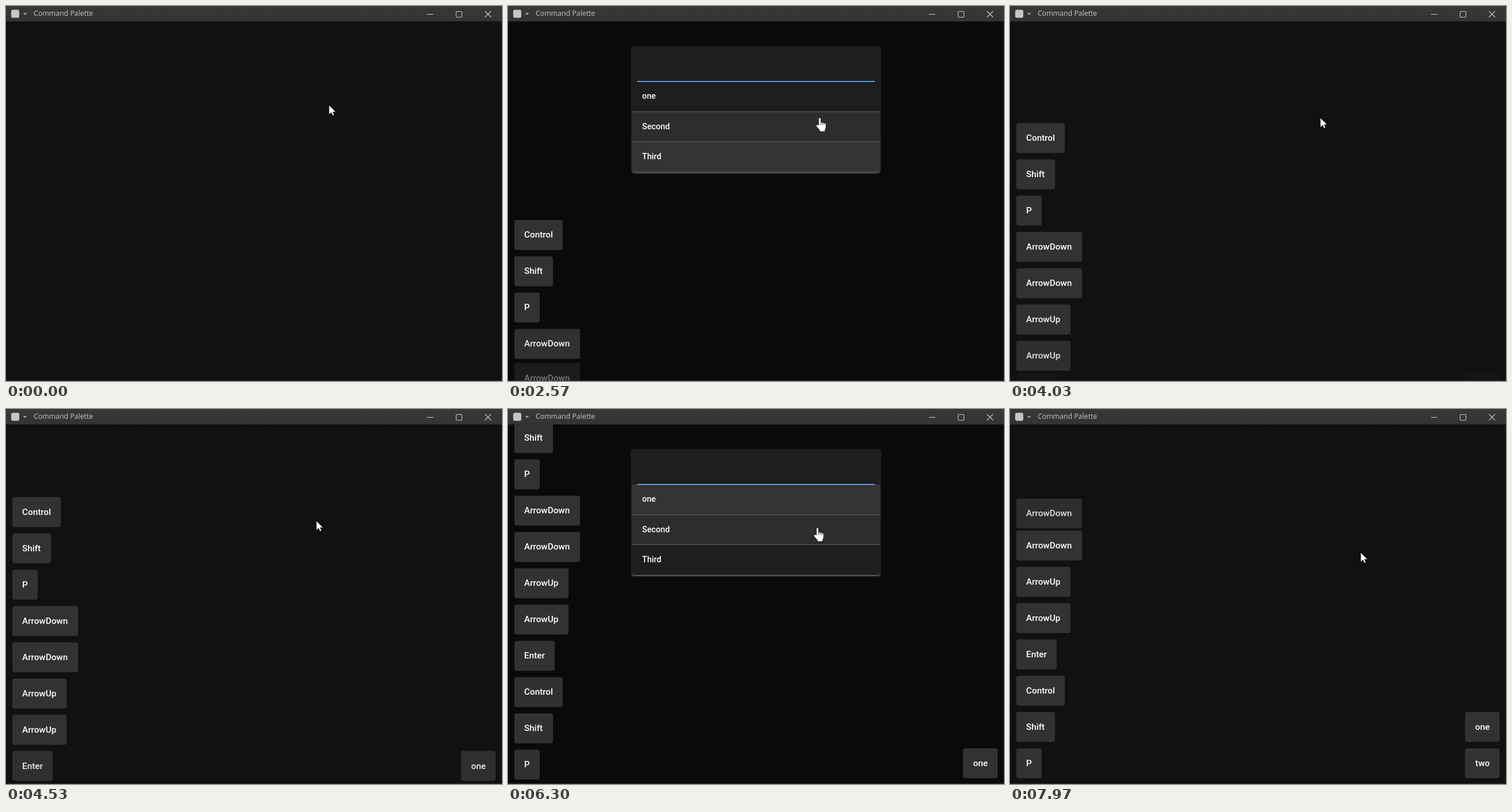
An HTML page for the animation above (8 s loop, 860x651 px).

```html
<!DOCTYPE html>
<html lang="en">
<head>
<meta charset="utf-8">
<title>Command Palette</title>
<style>
  html, body { margin: 0; width: 100%; height: 100%; overflow: hidden; background: #111; }
  #stage { position: relative; width: 860px; height: 651px; overflow: hidden; background: #111; }
  #bar { position: absolute; inset: 0 0 auto; height: 27px; background: linear-gradient(#383838, #343434 25px, #2a2a2a 27px); }
  #bar span { position: absolute; left: 48px; top: 0; font: 12.3px/26px "Open Sans", sans-serif; color: #c2c6ca; }
  #bar svg, #cursor { position: absolute; left: 0; top: 0; overflow: visible; }
  #page { position: absolute; inset: 0; clip-path: inset(27px 0 1px 0); font: 500 15.25px/52px Roboto, sans-serif; color: #fff; }
  #shade { position: absolute; inset: 0; background: #0a0a0a; }
  #panel { position: absolute; left: 215px; top: 70px; width: 430px; height: 219px; border-radius: 4px;
    background: #1e1e1e; box-shadow: 0 1px 3px #666; font-size: 14.3px; }
  #line { position: absolute; z-index: 1; left: 9px; top: 60px; width: 412px; height: 2px; background: #5b99df; }
  #caret { position: absolute; left: 17px; top: 22px; width: 1px; height: 18px; background: #fff; }
  #rows { position: absolute; left: 0; right: 0; top: 61px; }
  .row { box-sizing: border-box; height: 52.5px; padding-left: 17.5px; line-height: 51px; border-bottom: 1px solid #626262; }
  .row:last-child { border-radius: 0 0 4px 4px; }
  .toast { position: absolute; top: 0; height: 52px; padding: 0 17.4px; border-radius: 4px; background: #323232; white-space: nowrap; }
  #edge { position: absolute; inset: 27px 0 0; border: solid #303030; border-width: 0 0 1px; box-shadow: inset -1px 0 #222; }
</style>
</head>
<body>
<div id="stage">
  <div id="page">
    <div id="shade"></div>
    <div id="panel">
      <div id="line"></div><div id="caret"></div>
      <div id="rows"></div>
    </div>
    <div id="toasts"></div>
  </div>
  <div id="bar">
    <svg width="860" height="27" fill="none" stroke="#c8c8c8" stroke-width="1.1">
      <rect x="9" y="6.5" width="14" height="14" rx="3" fill="#c4c5c9" stroke="none"/>
      <path d="M29.5 12h7l-3.5 4z" fill="#999" stroke="none"/>
      <path d="M730 14.5h11M830.5 9l10.5 10.5M841 9l-10.5 10.5"/>
      <rect x="780.5" y="9.5" width="10" height="10" rx="1.5"/>
    </svg>
    <span>Command Palette</span>
  </div>
  <div id="edge"></div>
  <svg id="cursor" width="30" height="30" fill="#fff" stroke="#111" stroke-width=".8" stroke-linejoin="round">
    <path id="arrow" d="M0 0V16.5L4 13 6.5 18.5 9.2 17.3 6.8 12H12Z"/>
    <g id="hand" transform="translate(.7 0)">
      <path d="M0 13V2a1.9 1.9 0 0 1 3.8 0V8q1.7-1 2.8.5 1.7-.8 2.8.7 3.2-.4 3.2 2.3V16q0 3-1.6 5v3H1.6v-2.5L-3.6 15.6q-1.6-2.8.4-3.4T0 13z"/>
      <path d="M3.8 8v4.5M6.6 8.7v3.8M9.4 9.4v3.4" fill="none"/>
    </g>
  </svg>
</div>
<script>
const LOOP = 8000, LIFE = 6013, PITCH = 63, BASE = 589, FLY = 56;
const SLIDE = 952, LEAVE = 400;
const ROWS_TOP = 131, ROW_HEIGHT = 52.5;
const $ = id => document.getElementById(id);

const keys = [
  ['Control', 795], ['Shift', 885], ['P', 987], ['ArrowDown', 1940], ['ArrowDown', 2397],
  ['ArrowUp', 3360], ['ArrowUp', 3544], ['Enter', 3990],
  ['Control', 5490], ['Shift', 5580], ['P', 5670]
];
const results = [['one', 3990], ['two', 6690]];
const openings = [[987, 3990], [5670, 6690]];
const selections = [[0, 0], [1940, 1], [2397, 2], [3360, 1], [3544, 0]];
const cursorPath = [
  [30, 560, 172], [270, 538, 194], [4800, 538, 194], [4930, 606, 204], [5030, 664, 204],
  [5800, 664, 204], [6250, 534, 206], [7300, 534, 206], [7930, 608, 249]
];

const clamp01 = x => Math.min(1, Math.max(0, x));
const remaining = (elapsed, duration) => (1 - clamp01(elapsed / duration)) ** 3;

const rows = ['one', 'Second', 'Third'].map(label => {
  const row = document.createElement('div');
  row.className = 'row';
  row.textContent = label;
  $('rows').append(row);
  return row;
});

function makeToasts(list, side) {
  return list.map(([label, time]) => {
    const el = document.createElement('div');
    el.className = 'toast';
    el.textContent = label;
    el.style[side] = '10.7px';
    $('toasts').append(el);
    return { el, time };
  });
}
const stacks = [makeToasts(keys, 'left'), makeToasts(results, 'right')];

// The newest toast flies in; every older one slides up by one place.
function drawStack(stack, t) {
  const shown = stack.filter(toast => toast.time <= t).length;
  const newest = shown ? stack[shown - 1].time : 0;
  stack.forEach(({ el, time }, i) => {
    const visible = i < shown && t < time + LIFE + LEAVE;
    el.style.display = visible ? '' : 'none';
    if (!visible) return;
    const left = remaining(t - newest, SLIDE);
    const gone = 1 - remaining(t - time - LIFE, LEAVE);
    const y = BASE - PITCH * (shown - 1 - i) + left * (i === shown - 1 ? FLY : PITCH) + gone * FLY;
    el.style.transform = `translateY(${y}px)`;
    el.style.opacity = (1 - remaining(t - time, SLIDE)) * (1 - gone);
  });
}

function cursorAt(t) {
  const next = cursorPath.findIndex(p => p[0] > t);
  if (next === 0) return cursorPath[0].slice(1);
  if (next < 0) return cursorPath.at(-1).slice(1);
  const [t0, x0, y0] = cursorPath[next - 1], [t1, x1, y1] = cursorPath[next];
  const k = (t - t0) / (t1 - t0);
  return [x0 + (x1 - x0) * k, y0 + (y1 - y0) * k].map(Math.round);
}

function draw(t) {
  const opening = openings.find(([from, to]) => t >= from && t < to);
  const [x, y] = cursorAt(t);
  const row = Math.floor((y - ROWS_TOP) / ROW_HEIGHT);
  const overRows = opening && x >= 215 && x < 645 && row in rows;
  const selected = selections.findLast(([time]) => time <= t)[1];

  $('shade').style.display = $('panel').style.display = opening ? '' : 'none';
  $('caret').style.display = opening && (t - opening[0]) % 1000 < 500 ? '' : 'none';
  rows.forEach((el, i) => {
    el.style.backgroundColor = i === selected ? '#343434' : overRows && i === row ? '#2d2d2d' : '';
  });
  stacks.forEach(stack => drawStack(stack, t));

  $('cursor').style.transform = `translate(${x}px, ${y}px)`;
  $('arrow').style.display = overRows ? 'none' : '';
  $('hand').style.display = overRows ? '' : 'none';
}

const start = performance.now();
function tick() {
  draw((performance.now() - start) % LOOP);
  requestAnimationFrame(tick);
}
tick();
</script>
</body>
</html>
```
